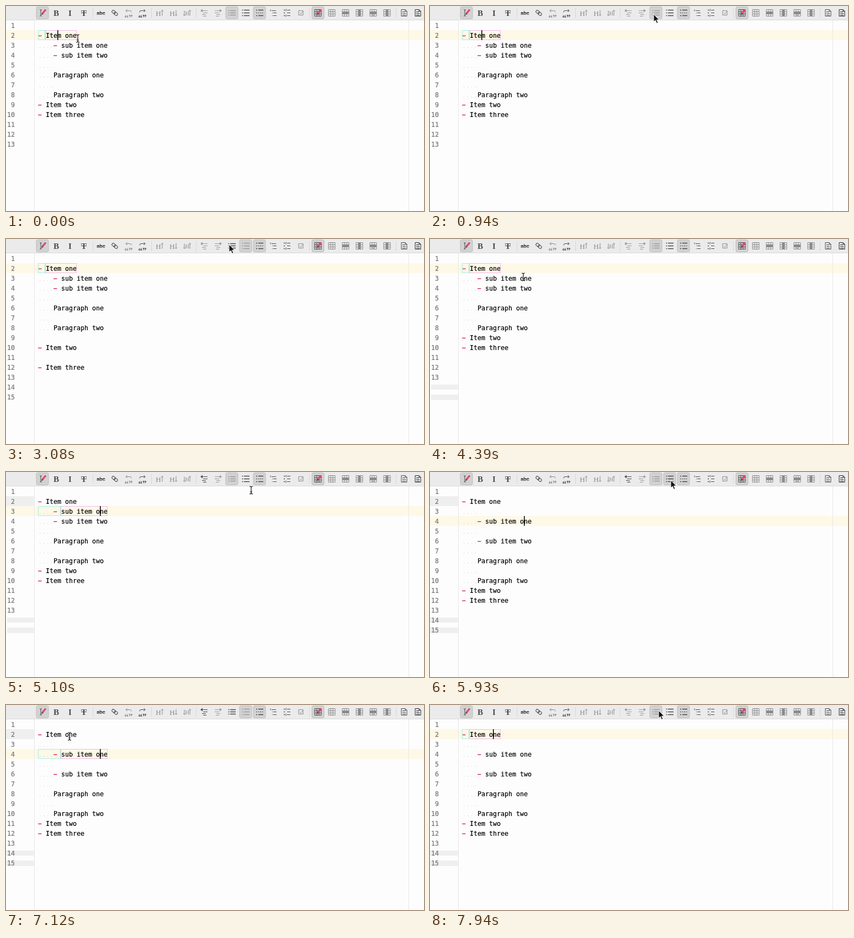
An HTML page that plays this animation: 757 px wide and 373 px high, repeating every 8 s.

```html
<!DOCTYPE html>
<html lang="en">
<head>
<meta charset="utf-8">
<title>Markdown list editing</title>
<style>
html, body { margin: 0; width: 100%; height: 100%; overflow: hidden; background: #fdfdfd; }
svg { display: block; width: 757px; height: 373px; }
.code { font: 11.63px "DejaVu Sans Mono", "Liberation Mono", monospace; white-space: pre; stroke: #000; stroke-width: .2; }
.num { fill: #757575; stroke: #757575; text-anchor: end; }
.dash { fill: #dd1f55; stroke: none; font-weight: bold; }
.serif { font: bold 15px "Liberation Serif", "Noto Serif", serif; text-anchor: middle; }
.thin { font-weight: normal; font-size: 13px; }
.small { font-size: 10px; }
.abc { font: bold 9px "Liberation Sans", sans-serif; text-anchor: middle; }
.icon { color: #4a4a4a; fill: none; stroke: currentColor; }
.icon text, .solid { stroke: none; fill: currentColor; }
.list { stroke-width: 1.6; }
.dim { color: #9b9b9b; }
.grid { color: #8a8a8a; }
.dark { color: #222; }
.pressed { fill: #d2d2d2; stroke: #bdbdbd; }
.pen { stroke: #e0486a; stroke-width: 3.4; }
.cyan { fill: none; stroke: #a5efe6; }
.pink { fill: none; stroke: #f2b9ee; }
.stale { fill: #efefef; }
.hide { display: none; }
</style>
</head>
<body>
<svg id="stage" viewBox="0 0 757 373"></svg>
<script>
const LOOP = 8000, STEP = 118.4, CHAR = 7, LEFT = 58, ROW = 18, GUTTER = 52;
const rowTop = n => 26 + ROW * (n - 1);
const indent = "    ";
const subs = [indent + "- sub item one", indent + "- sub item two"];
const paras = [indent, indent + "Paragraph one", indent, indent + "Paragraph two"];
const docs = {
  tight: ["", "- Item one", ...subs, ...paras, "- Item two", "- Item three", "", "", ""],
  loose: ["", "- Item one", ...subs, ...paras, "", "- Item two", "", "- Item three", "", "", ""],
  subLoose: ["", "- Item one", indent, subs[0], indent, subs[1], ...paras,
    "- Item two", "- Item three", "", "", ""]
};

// Document rows
function lineMarkup(src, i) {
  const y = rowTop(i + 1) + 14;
  let out = `<text class="code num" x="16" y="${y}">${i + 1}</text>`;
  let col = 0;
  if (src.startsWith(indent)) {
    for (; col < 4; col++)
      out += `<rect x="${LEFT + col * CHAR + 3}" y="${y - 1}" width="1" height="1" fill="#c4c4c4"/>`;
  }
  if (src[col] === "-") {
    out += `<text class="code dash" x="${LEFT + col * CHAR}" y="${y}">−</text>`;
    col += 2;
  }
  const rest = src.slice(col);
  return rest ? out + `<text class="code" x="${LEFT + col * CHAR}" y="${y}">${rest}</text>` : out;
}
const docMarkup = name => `<g id="${name}">${docs[name].map(lineMarkup).join("")}</g>`;

// Toolbar
const path = (d, cls = "") => `<path class="${cls}" d="${d}"/>`;
const label = (s, cls = "serif", attrs = "y='5'") => `<text class="${cls}" ${attrs}>${s}</text>`;
const icon = (x, body, cls = "", id = "") =>
  `<g ${id && `id="${id}"`} class="icon ${cls}" transform="translate(${x} 12.5)">${body}</g>`;
const press = (x, id = "") =>
  `<rect ${id && `id="${id}"`} class="pressed" x="${x - 11}" y="1.5" width="22" height="22" rx="2.5"/>`;
const bullets = (gap, from = -3) => [-gap, 0, gap]
  .map(y => path(`M-6.500 ${y}h2M${from} ${y}H7`, "list")).join("");
const pencil = path("M0 1L6-6", "pen") + path("M-1 0l-1 4 4-2z", "solid");
const quote = flip => label("“”", "serif", "y='13'") +
  `<g transform="scale(${flip} 1)">${path("M-5-4H3q2 0 2 3M-2.500-6.500L-5-4l2.500 2.500")}</g>`;
const shift = flip => `<g transform="scale(${flip} 1)">` +
  path("M-7-4l4-3v6z", "solid") + path("M-4-4H6M-2 0H6M-4 3H3M-2 6H4") + "</g>";
const heading = arrow => label("H", "serif thin", "x='-2' y='5'") + path(arrow);
const table = (extra = "") =>
  path("M-6-6H6V6H-6zM-6-2H6M-6 2H6M-2-6V6M2-6V6") + extra;
const sheet = path("M-5-6H2L5-3V6H-5zM2-6v3h3M-3-2h5M-3 1h6M-3 4h6");
const H_BAND = path("M-6-2H6V2H-6z", "solid"), V_BAND = path("M-2-6H2V6H-2z", "solid");

const toolbar = `<rect width="757" height="25" fill="#ebebeb"/>
  <rect y="25" width="757" height="1" fill="#d9d9d9"/>` +
  [157.5, 263.5, 344.5, 549.5, 706.5].map(x =>
    `<path d="M${x} 5V21" stroke="#b5b5b5" stroke-dasharray="1 2"/>`).join("") +
  press(66) + press(409, "bgTight") + press(434, "bgLoose") + press(459) + press(565) +
  icon(66, path("M-5-6q2 0 2 2V4q0 2-2 2M-1-6q-2 0-2 2M-3 4q0 2 2 2") + pencil) +
  icon(91, label("B")) +
  icon(116, label("I", "serif", "y='5' font-style='italic'")) +
  icon(141, label("T", "serif", "y='5'") + path("M-5 0H5")) +
  icon(172, label("abc", "abc", "y='3'") + path("M-7.500 0H7.500")) +
  icon(197, `<g transform="rotate(40)"><rect x="-6" y="-2.500" width="7" height="5" rx="2.500"/>
    <rect x="-1" y="-2.500" width="7" height="5" rx="2.500"/></g>`) +
  icon(222, quote(1), "grid") + icon(247, quote(-1)) +
  icon(278, heading("M5 5V-5M3-3l2-2 2 2"), "grid") +
  icon(303, heading("M5-5V5M3 3l2 2 2-2"), "grid") +
  icon(328, label("H", "serif thin small", "y='4'") +
    path("M-5 5V-4M-7 3l2 2 2-2M5 5V-5M3-3l2-2 2 2"), "grid") +
  icon(359, shift(1), "", "outdent") + icon(384, shift(-1), "dim") +
  icon(409, bullets(4), "", "icTight") + icon(434, bullets(5), "", "icLoose") +
  icon(459, path("M-6-5h2M-2-5H7M-6 5h2M-2 5H7", "list") +
    `<g stroke-dasharray="2 1.500">${path("M-6 0H7")}</g>`) +
  icon(484, path("M-5-6v3M-3-4H5M-2 0h1M0 0H6M-2 5h1M0 5H6")) +
  icon(509, path("M-6-5h2M-6 0h2M-6 5h2", "list") + path("M-2-7v4M0-5H6M0 0H6M-2 3v4M0 5H6")) +
  icon(534, path("M-4-4H4V4H-4zM-2 0l2 2L4-3"), "grid") +
  icon(565, table(pencil)) + icon(590, table(), "grid") +
  icon(615, table(H_BAND), "grid") + icon(640, table(V_BAND), "grid") +
  icon(665, table(H_BAND + path("M-2 4H2")), "grid") +
  icon(690, table(V_BAND + path("M0 2V6")), "grid") +
  icon(721, sheet) + icon(746, sheet, "dark");

const BEAM = "M-3-7Q0-7 0-5Q0-7 3-7M0-5V5M-3 7Q0 7 0 5Q0 7 3 7M-2 3H2";
document.getElementById("stage").innerHTML = `
  <rect width="757" height="373" fill="#fdfdfd"/>
  <rect id="staleRow" class="stale" y="${rowTop(2)}" width="${GUTTER}" height="${ROW}"/>
  <g id="staleEnd" class="stale"><rect y="265" height="9"/><rect y="283" height="10"/></g>
  <rect id="active" width="757" height="${ROW}" fill="#fef8e6"/>
  <path d="M${GUTTER - .5} 26V373M729.500 26V373" stroke="#e8e8e8"/>
  ${Object.keys(docs).map(docMarkup).join("")}
  <g id="boxes"><rect id="mark" class="cyan" x="58.500" height="17"/><rect id="body" class="pink" height="17"/></g>
  <rect id="caret" width="1.500" height="${ROW}"/>
  ${toolbar}
  <g id="cursor">
    <g id="beam" fill="none"><path d="${BEAM}" stroke="#fff" stroke-opacity=".7" stroke-width="2.500"/>
      <path d="${BEAM}" stroke="#111" stroke-width="1.200"/></g>
    <path id="arrow" d="M0 0V14L3.200 11 5.600 16.500 8 15.500 5.600 10.200H10Z" fill="#111" stroke="#fff"/>
  </g>`;

const $ = Object.fromEntries([...document.querySelectorAll("[id]")].map(n => [n.id, n]));
const show = (node, on) => node.classList.toggle("hide", !on);
const set = (node, attrs) => { for (const k in attrs) node.setAttribute(k, attrs[k]); };

// State changes, each merged over the ones before
const events = [
  [0, { doc: "tight", row: 2, caret: 93, boxes: true, checked: "tight", hover: false,
        sub: false, staleX: -1, staleRow: false }],
  [1060, { hover: true }],
  [1770, { doc: "loose", boxes: false }],
  [2125, { boxes: true, checked: "loose" }],
  [2840, { hover: false }],
  [3430, { doc: "tight", boxes: false, staleX: 2 }],
  [3665, { boxes: true, checked: "tight" }],
  [4720, { row: 3, caret: 170, sub: true, staleRow: true }],
  [5440, { hover: true }],
  [5915, { doc: "subLoose", row: 4, boxes: false, staleX: 0 }],
  [6270, { boxes: true, checked: "loose" }],
  [6620, { hover: false }],
  [7440, { row: 2, caret: 114, checked: "tight", sub: false, staleRow: false }]
];
const blinks = [360, 820, 1300, 1770, 2250, 2730, 3075, 3430, 3920, 4600, 5210, 5700, 6500, 6990];
const moves = [
  [0, 130, 59], [118, 130, 59], [236, 138, 66], [820, 405, 15], [1300, 428, 10],
  [2620, 428, 10], [3075, 404, 10], [3600, 404, 10], [4380, 169, 69],
  [4720, 169, 69], [5090, 444, 33], [5440, 436, 15],
  [6400, 436, 15], [7100, 115, 57], [7440, 115, 57], [7930, 414, 10], [LOOP, 414, 10]
];

function cursorAt(t) {
  const i = moves.findIndex(m => m[0] > t);
  const [t0, x0, y0] = moves[i - 1], [t1, x1, y1] = moves[i];
  const u = (t - t0) / (t1 - t0), e = u * u * (3 - 2 * u);
  return [Math.round(x0 + (x1 - x0) * e), Math.round(y0 + (y1 - y0) * e)];
}

function render(t) {
  const s = Object.assign({}, ...events.filter(e => e[0] <= t).map(e => e[1]));
  const top = rowTop(s.row), split = s.sub ? 99.5 : 71.5, end = s.sub ? 183.5 : 127.5;
  for (const name in docs) show($[name], name === s.doc);
  set($.active, { y: top });
  show($.staleRow, s.staleRow);
  show($.staleEnd, s.staleX >= 0);
  for (const r of $.staleEnd.children) set(r, { x: s.staleX, width: GUTTER - s.staleX });

  show($.boxes, s.boxes);
  set($.mark, { y: top + .5, width: split - 59.5 });
  set($.body, { x: split, y: top + .5, width: end - split });
  set($.caret, { x: s.caret, y: top });
  show($.caret, blinks.filter(b => b <= t).length % 2 === 0);

  const tight = s.checked === "tight";
  show($.bgTight, tight);
  show($.bgLoose, !tight || s.hover);
  $.icTight.classList.toggle("dim", tight);
  $.icLoose.classList.toggle("dim", !tight);
  $.outdent.classList.toggle("dim", !s.sub);

  const [x, y] = cursorAt(t);
  set($.cursor, { transform: `translate(${x} ${y})` });
  show($.arrow, y < 26);
  show($.beam, y >= 26);
}

const start = performance.now();
function tick() {
  const t = (performance.now() - start) % LOOP;
  render(Math.min(Math.floor((t + 6) / STEP) * STEP, LOOP - 1));
  requestAnimationFrame(tick);
}
tick();
</script>
</body>
</html>
```
